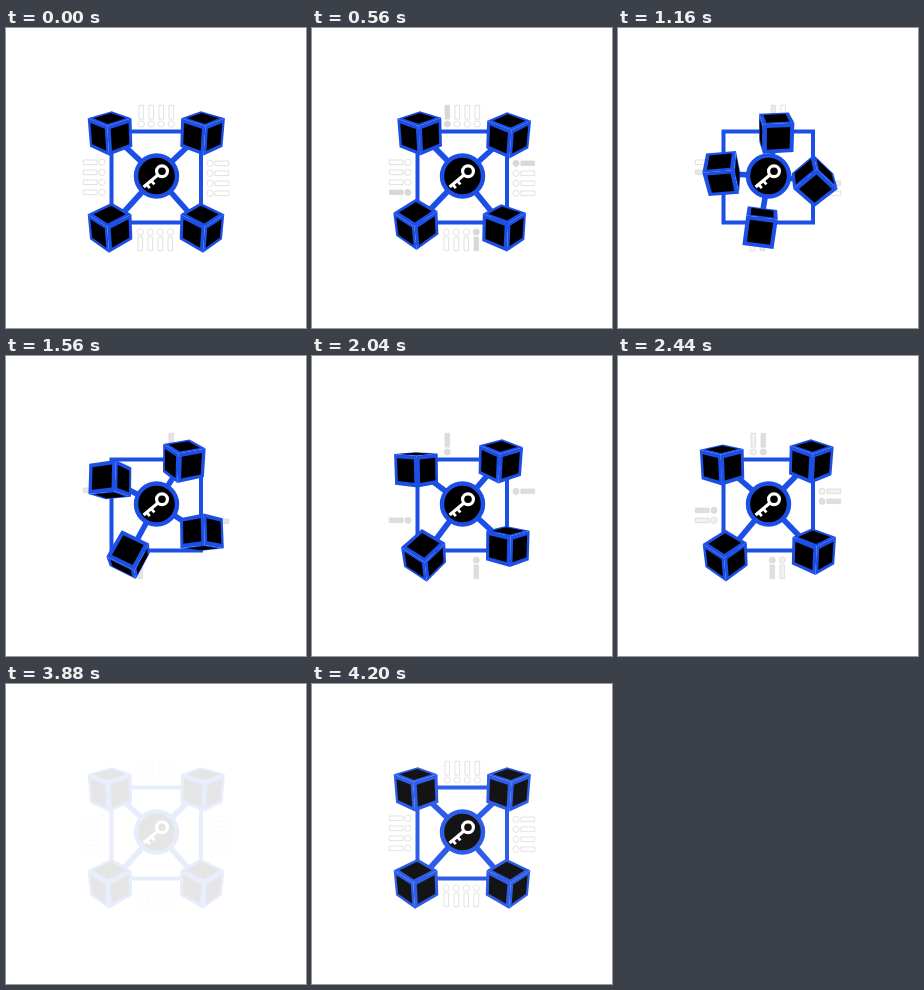
Animation, 300 px wide and 300 px high, one loop 4.24 s. Source, as an HTML page with a canvas:

```html
<!DOCTYPE html>
<html lang="en">
<head>
<meta charset="utf-8">
<title>Key and blocks</title>
<style>
  html, body { margin: 0; width: 100%; height: 100%; overflow: hidden; background: #fff; }
  canvas { display: block; width: 300px; height: 300px; }
</style>
</head>
<body>
<canvas id="stage" width="300" height="300"></canvas>
<script>
const ctx = document.getElementById('stage').getContext('2d');
const LOOP = 4240, STEP = 40;
const BLUE = '#1c4fe6', RAD = Math.PI / 180;
const HUB = { x: 150.5, y: 148 };
const HALF = 15.2, INNER = 0.74, CAMERA = 400, MID = 150, PITCH = 28;

// Each block slides to the next corner, clockwise, while it turns.
const corners = [
  { x: 104.4, y: 104.7 },
  { x: 196.2, y: 104.7 },
  { x: 195.6, y: 199 },
  { x: 104.4, y: 199 }
];
const turns = [
  { pitch: 0, yaw: 90, lag: 0 },
  { pitch: 180, yaw: 0, lag: 80 },
  { pitch: -180, yaw: 90, lag: 0 },
  { pitch: 180, yaw: 90, lag: 20 }
];

const clamp = v => Math.max(0, Math.min(1, v));
const ramp = (t, from, to) => clamp((t - from) / (to - from));
const mix = (a, b, p) => a + (b - a) * p;

// cubic-bezier(.4, 0, 0, 1)
function ease(x) {
  let lo = 0, hi = 1;
  for (let i = 0; i < 24; i++) {
    const s = (lo + hi) / 2;
    if (1.2 * (1 - s) * (1 - s) * s + s * s * s < x) lo = s; else hi = s;
  }
  return lo * lo * (3 - 2 * lo);
}

function line(width, color, ...pts) {
  ctx.beginPath();
  pts.forEach(([x, y]) => ctx.lineTo(x, y));
  ctx.lineWidth = width;
  ctx.strokeStyle = color;
  ctx.stroke();
}

function disc(x, y, r) {
  ctx.beginPath();
  ctx.arc(x, y, r, 0, 2 * Math.PI);
}

function fillPoly(pts, color) {
  ctx.beginPath();
  pts.forEach(([x, y]) => ctx.lineTo(x, y));
  ctx.fillStyle = color;
  ctx.fill();
}

// One camera in front of the stage centre sees all blocks.
function project(v, c) {
  const cy = Math.cos(c.yaw * RAD), sy = Math.sin(c.yaw * RAD);
  const cp = Math.cos(c.pitch * RAD), sp = Math.sin(c.pitch * RAD);
  const x = v[0] * cy + v[2] * sy, z = v[2] * cy - v[0] * sy;
  const scale = CAMERA / (CAMERA - v[1] * sp - z * cp);
  return [
    MID + (c.x - MID + x) * scale,
    MID + (c.y - MID - v[1] * cp + z * sp) * scale
  ];
}

function drawCube(c) {
  for (let axis = 0; axis < 3; axis++) {
    for (const side of [-1, 1]) {
      const square = size => [[-1, -1], [1, -1], [1, 1], [-1, 1]].map(([u, w]) => {
        const v = [];
        v[axis] = side * HALF;
        v[(axis + 1) % 3] = u * side * size;
        v[(axis + 2) % 3] = w * size;
        return project(v, c);
      });
      const face = square(HALF);
      const area = face.reduce((sum, a, i) => {
        const b = face[(i + 1) % 4];
        return sum + a[0] * b[1] - b[0] * a[1];
      }, 0);
      if (area >= 0) continue;
      fillPoly(face, BLUE);
      fillPoly(square(HALF * INNER), '#000');
    }
  }
}

// Pins vanish one after another, then come back in the same order.
function drawPins(t) {
  for (let k = 0; k < 4; k++) {
    const out = 240 + 370 * k, back = 1950 + 370 * k;
    if (t >= out + 400 && t < back) continue;
    const grey = t < back ? ramp(t, out, out + 320) : 1 - ramp(t, back, back + 750);
    const level = Math.round(mix(255, 216, grey));
    ctx.fillStyle = `rgb(${level},${level},${level})`;
    ctx.strokeStyle = '#dadada';
    ctx.lineWidth = 0.8;
    for (let side = 0; side < 4; side++) {
      ctx.save();
      ctx.translate(150, 150);
      ctx.rotate(side * Math.PI / 2);
      const x = (side < 2 ? -14.7 : -14.3) + 10 * k;
      ctx.beginPath();
      ctx.rect(x - 2.3, -72.7, 4.6, 13.8);
      ctx.fill();
      ctx.stroke();
      disc(x, -54, 3.1);
      ctx.fill();
      ctx.stroke();
      ctx.restore();
    }
  }
}

function drawHub() {
  disc(HUB.x, HUB.y, 20.5);
  ctx.fillStyle = '#000';
  ctx.fill();
  ctx.lineWidth = 4.4;
  ctx.strokeStyle = BLUE;
  ctx.stroke();

  disc(156, 143.2, 5.4);
  ctx.lineWidth = 3.2;
  ctx.strokeStyle = '#fff';
  ctx.stroke();
  line(3.2, '#fff', [152.2, 146.8], [137.6, 159]);
  line(2.8, '#fff', [140.6, 156.4], [143.8, 160.2]);
  line(2.8, '#fff', [145.2, 152.6], [148.4, 156.4]);
}

function draw(t) {
  ctx.globalAlpha = 1;
  ctx.fillStyle = '#fff';
  ctx.fillRect(0, 0, 300, 300);

  drawPins(t);
  ctx.lineWidth = 4;
  ctx.strokeStyle = BLUE;
  ctx.strokeRect(105.5, 103.5, 89.5, 91);

  const cubes = corners.map((a, i) => {
    const b = corners[(i + 1) % 4], turn = turns[i];
    const p = ease(ramp(t - turn.lag, 200, 3360));
    return {
      x: mix(a.x, b.x, p),
      y: mix(a.y, b.y, p),
      pitch: PITCH + turn.pitch * p,
      yaw: 45 + turn.yaw * p
    };
  });
  cubes.forEach(c => line(5.6, BLUE, [HUB.x, HUB.y], [c.x, c.y]));
  drawHub();
  cubes.forEach(drawCube);

  // Fade to white and back before the loop restarts.
  const veil = Math.min(ramp(t, 3160, 3480), 1 - ramp(t, 3840, 4230));
  ctx.globalAlpha = veil;
  ctx.fillStyle = '#fff';
  ctx.fillRect(0, 0, 300, 300);
}

const start = performance.now();
function tick() {
  const t = (performance.now() - start) % LOOP;
  draw(Math.floor(t / STEP) * STEP);
  requestAnimationFrame(tick);
}
tick();
</script>
</body>
</html>
```
